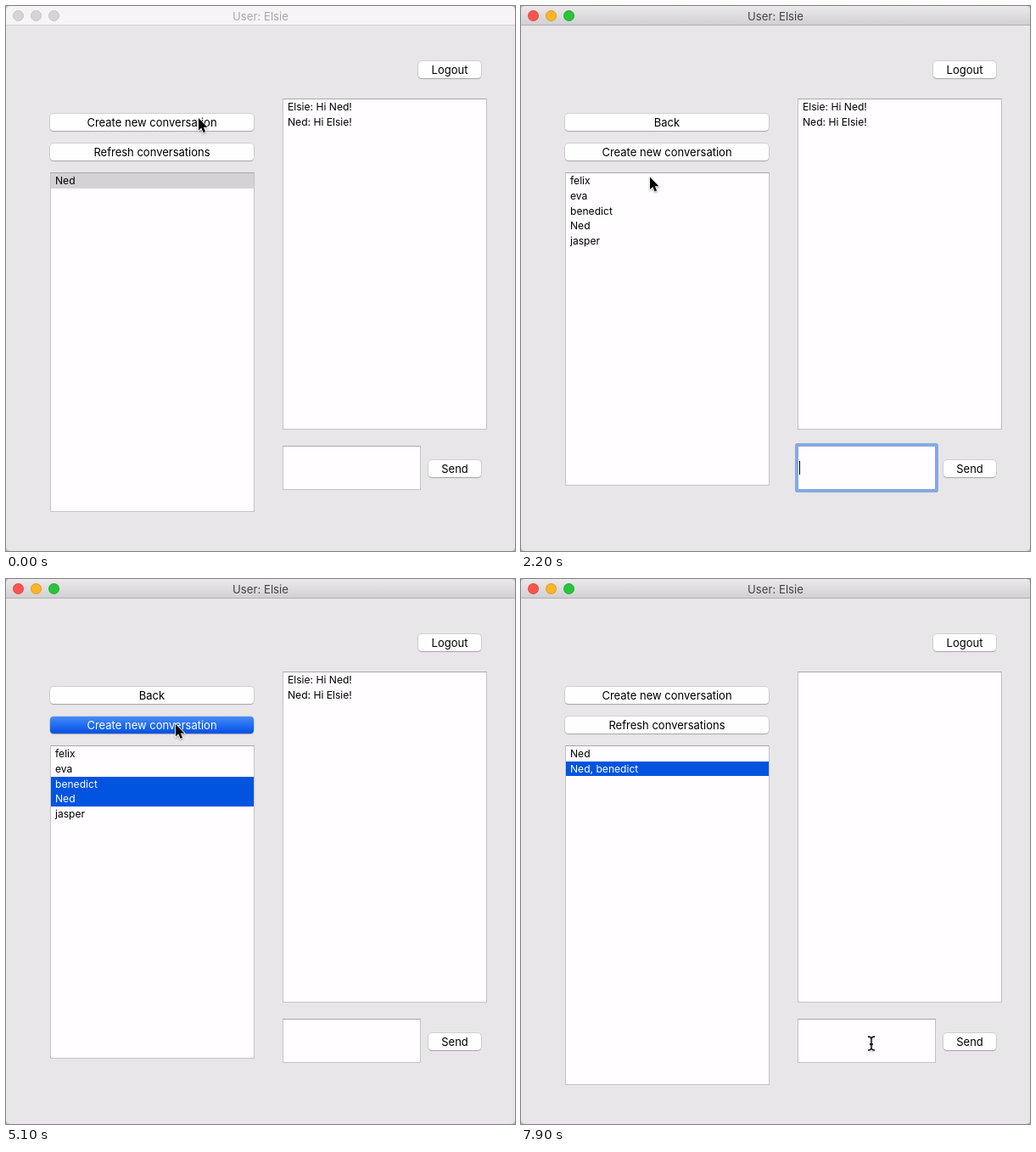
Animation of 600 by 642 pixels, one loop 8 s. Source, as an HTML page:

```html
<!DOCTYPE html>
<html lang="en">
<head>
<meta charset="utf-8">
<title>Chat window</title>
<style>
html, body { margin: 0; width: 100%; height: 100%; overflow: hidden; background: #b9bdc4; }
#win { position: absolute; inset: 0; border-radius: 5px; overflow: hidden; background: #e8e6e8;
  font: 13px/20px Inter, "Open Sans", sans-serif; color: #000; }
#win div, svg { position: absolute; box-sizing: border-box; }
#bar { left: 0; top: 0; width: 100%; height: 23px; line-height: 24px; text-align: center; font-size: 13.2px;
  color: #a9a7a9; background: #f6f4f6; border-bottom: 1px solid #d5d3d5; }
.active #bar { color: #454345; background: linear-gradient(#ebe9eb, #d2d0d2); border-color: #b2b0b2; }
.light { top: 5px; width: 13px; height: 13px; border-radius: 50%; background: #d6d4d6; border: .5px solid #c4c2c4; }
.active .light { background: var(--c); border-color: #0002; }
.button { height: 20px; border-radius: 4px; text-align: center; background: #fffeff;
  box-shadow: 0 0 0 .5px #0003, 0 1px 1px #0003; }
.button.down { color: #fff; background: linear-gradient(#468cfa, #0050e6); }
.box { background: #fffdff; border: 1px solid #c4c2c4; border-top-color: #a9a7a9; }
.row { left: 0; width: 100%; height: 17.6px; padding-left: 5px; font-size: 12.1px; line-height: 17.6px; white-space: pre; }
.row.on { background: #d4d2d4; }
.active .row.on { background: #0054e0; color: #fff; }
#caret { left: 328px; top: 536px; width: 1px; height: 16px; background: #000; }
svg { left: 0; top: 0; overflow: visible; filter: drop-shadow(0 1px 1px #0005); }
</style>
</head>
<body>
<div id="win">
  <div id="bar">User: Elsie</div>
  <div class="light" style="left:8px;--c:#fb554c"></div>
  <div class="light" style="left:28.5px;--c:#fdb527"></div>
  <div class="light" style="left:49.5px;--c:#27c53a"></div>
  <div class="button" style="left:486px;top:65px;width:74px">Logout</div>
  <div class="button" id="first" style="left:52px;top:127px;width:240px"></div>
  <div class="button" id="second" style="left:52px;top:162px;width:240px"></div>
  <div class="button" style="left:498px;top:534.5px;width:62px">Send</div>
  <div class="box" id="list" style="left:52px;top:196px;width:241px"></div>
  <div class="box" id="chat" style="left:326px;top:109px;width:241px;height:390px"></div>
  <div class="box" id="input" style="left:326px;top:518px;width:163px;height:52px"></div>
  <div id="caret"></div>
  <svg id="cursor" width="1" height="1">
    <path id="arrow" d="M0 0V14.6L3.3 11.6 5.6 17 8.1 15.9 5.8 10.7H10.4Z" stroke="#fff" stroke-width="1.6" paint-order="stroke"/>
    <path id="beam" d="M-4-8Q0-8 0-5Q0-8 4-8M0-5V5M-4 8Q0 8 0 5Q0 8 4 8M-2 1H2" fill="none" stroke="#000" stroke-width="1.3"/>
  </svg>
</div>
<script>
const $ = id => document.getElementById(id);
const LOOP = 8000, STEP = 100;
const ACTIVATE = 100, OPEN = 700, PICK = 3200, ADD = 3900, CREATE = 5200, SELECT = 6900;
const users = ['felix', 'eva', 'benedict', 'Ned', 'jasper'];
const messages = ['Elsie: Hi Ned!', 'Ned: Hi Elsie!'];

// time, x, y of the pointer
const path = [
  [0, 227, 132], [300, 226, 133], [1400, 226, 133], [2800, 104, 246], [3600, 104, 246],
  [4000, 98, 255], [4200, 98, 255], [4900, 200, 171], [5900, 200, 171], [6000, 179, 200],
  [6600, 112, 223], [7000, 112, 223], [7600, 412, 571], [7700, 415, 578], [7900, 413, 547]
];

const within = (t, a, b) => t >= a && t < b;

function pointer(t) {
  const i = path.findIndex(p => p[0] > t);
  if (i < 0) return path[path.length - 1].slice(1);
  const [t0, x0, y0] = path[i - 1], [t1, x1, y1] = path[i];
  const u = (t - t0) / (t1 - t0), e = u * u * (3 - 2 * u);
  return [x0 + (x1 - x0) * e, y0 + (y1 - y0) * e];
}

function fill(box, rows, selected = []) {
  box.innerHTML = rows.map((text, i) =>
    `<div class="row${selected.includes(i) ? ' on' : ''}" style="top:${.3 + i * 17.6}px">${text}</div>`).join('');
}

function draw(t) {
  const choosing = within(t, OPEN, CREATE);
  $('win').className = t >= ACTIVATE ? 'active' : '';

  $('first').textContent = choosing ? 'Back' : 'Create new conversation';
  $('second').textContent = choosing ? 'Create new conversation' : 'Refresh conversations';
  $('first').classList.toggle('down', within(t, 500, OPEN));
  $('second').classList.toggle('down', within(t, 5000, CREATE));

  $('list').style.height = (choosing ? 369 : 400) + 'px';
  if (choosing) fill($('list'), users, t >= ADD ? [2, 3] : t >= PICK ? [2] : []);
  else if (t < OPEN) fill($('list'), ['Ned'], [0]);
  else fill($('list'), ['Ned', 'Ned, benedict'], t >= SELECT ? [1] : []);
  fill($('chat'), t < SELECT ? messages : []);

  // The focus ring shrinks into place, then the caret blinks.
  const focused = within(t, OPEN, PICK), ring = Math.min(1, (t - OPEN + STEP) / 300);
  const color = `rgba(132,169,227,${ring})`;
  $('input').style.boxShadow = focused ? `0 0 0 ${3 + 10 * (1 - ring)}px ${color}` : '';
  $('input').style.borderColor = focused ? color : '';
  $('input').style.borderRadius = focused ? '1px' : '';
  $('caret').hidden = !(within(t, 950, PICK) && (t - 950) % 1000 < 500);

  const [x, y] = pointer(t), overInput = within(x, 326, 489) && within(y, 518, 570);
  $('cursor').style.transform = `translate(${x}px,${y}px)`;
  $('arrow').style.display = overInput ? 'none' : '';
  $('beam').style.display = overInput ? '' : 'none';
}

let last = -1;
function tick() {
  const t = Math.floor(performance.now() % LOOP / STEP) * STEP;
  if (t !== last) draw(last = t);
  requestAnimationFrame(tick);
}
tick();
</script>
</body>
</html>
```
